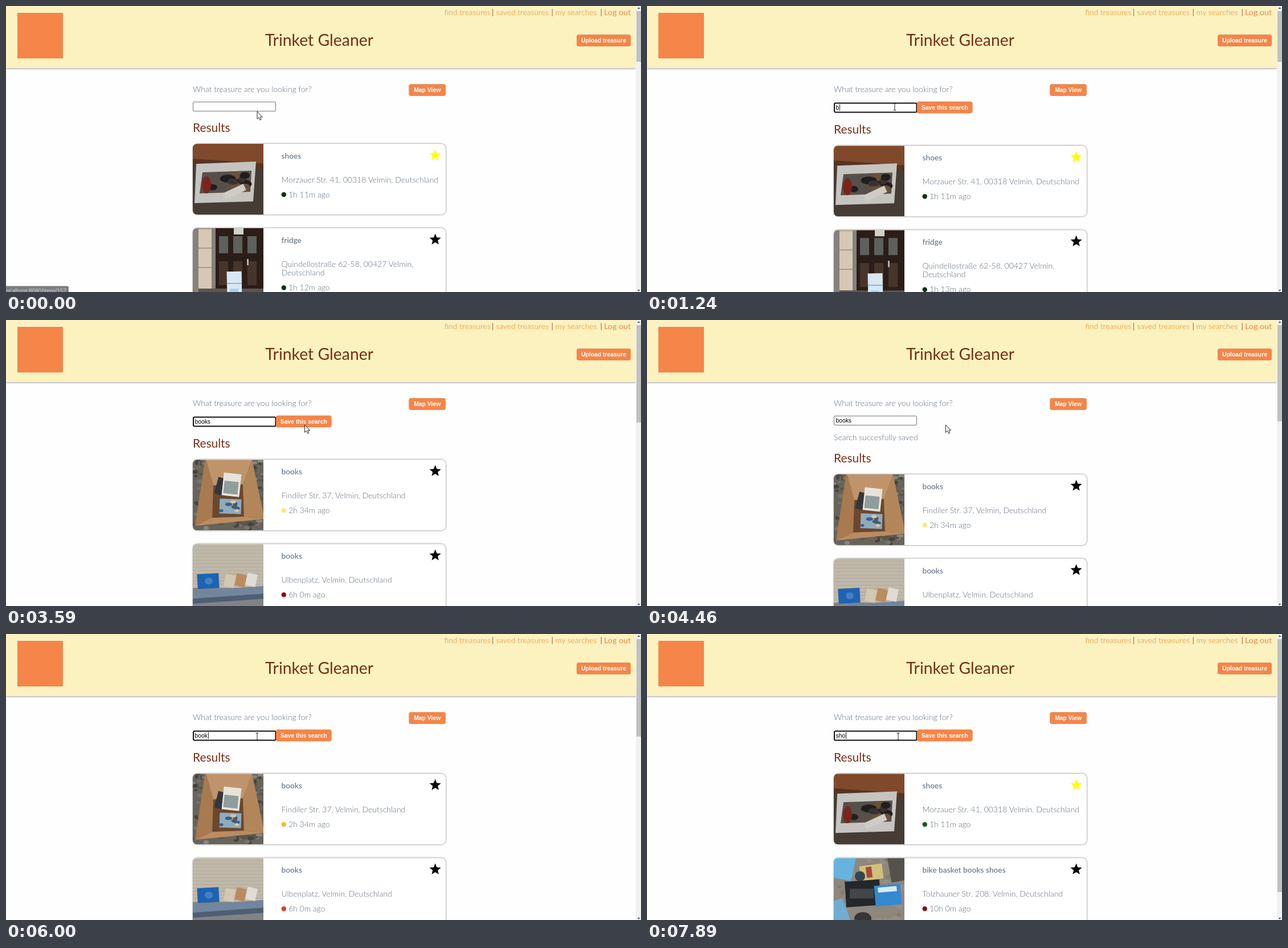
An HTML page that plays this animation: 1115x502 px, repeating every 8 s.

```html
<!DOCTYPE html>
<html lang="en">
<head>
<meta charset="utf-8">
<title>Trinket Gleaner</title>
<style>
  html, body { margin: 0; width: 100%; height: 100%; overflow: hidden; background: #fefefe; }
  svg { display: block; width: 1115px; height: 502px; }
  text { font: 300 14px Lato, "Open Sans", sans-serif; fill: #5d6d7e; white-space: pre; }
  .title { font-size: 28.4px; font-weight: 400; fill: #772f1a; text-anchor: middle; }
  .heading { font-size: 20.9px; font-weight: 400; fill: #772f1a; }
  .name { font-weight: 600; font-size: 13.7px; fill: #708090; }
  .nav { font-size: 13.6px; font-weight: 400; fill: #f2b05e; }
  .bar { fill: #b5482a; }
  .logout { font-size: 14.3px; fill: #f58549; }
  .button { font: 700 10.4px "Liberation Sans", Arial, sans-serif; fill: #fff; text-anchor: middle; }
  .typed { font: 400 10.3px "Liberation Sans", Arial, sans-serif; fill: #000; }
  .status { font: 400 9.6px "Open Sans", sans-serif; fill: #d0d3d4; }
  .shadow { filter: drop-shadow(0 0 1.6px #666); }
  .soft { filter: drop-shadow(0 0 .7px #aaa); }
  .header { filter: drop-shadow(0 1px 1.5px #999); }
  .photo { filter: blur(.5px); }
</style>
</head>
<body>
<svg viewBox="0 0 1115 502">
  <defs>
    <clipPath id="corner"><path d="M124 0H8Q0 0 0 8V116Q0 124 8 124H124Z"/></clipPath>
  </defs>
  <g id="stage"></g>
</svg>
<script>
const LOOP = 8000;
const stage = document.getElementById('stage');

const within = (t, from, to) => t >= from && t < to;
const repeat = (count, make) => Array.from({length: count}, (_, i) => make(i)).join('');

const rect = (x, y, w, h, fill, extra = '') =>
  `<rect x="${x}" y="${y}" width="${w}" height="${h}" fill="${fill}" ${extra}/>`;
const tilted = (x, y, w, h, angle, fill) =>
  rect(x - w / 2, y - h / 2, w, h, fill, `transform="rotate(${angle} ${x} ${y})"`);
const poly = (points, fill) => `<polygon points="${points.join(' ')}" fill="${fill}"/>`;
const oval = (x, y, rx, ry, fill) => `<ellipse cx="${x}" cy="${y}" rx="${rx}" ry="${ry}" fill="${fill}"/>`;
const text = (x, y, words, type = '') => `<text x="${x}" y="${y}" class="${type}">${words}</text>`;
const button = (x, y, w, label) =>
  rect(x, y, w, 20.5, '#f58549', 'rx="3.5" class="soft"') + text(x + w / 2, y + 14, label, 'button');

// Seeded specks filling a box, for pavement and clutter
function scatter(count, x, y, w, h, size, colors) {
  let seed = 7;
  const random = () => (seed = seed * 16807 % 2147483647) / 2147483647;
  return repeat(count, i => oval(x + w * random(), y + h * random(),
    size * (.6 + random()), size * (.5 + random() / 2), colors[i % colors.length]));
}
const paving = () => scatter(140, 0, 0, 124, 124, 4, ['#5b574f', '#77736a', '#47443e', '#8a867d']);

function cartonFlaps() {
  const inner = [[36, 45], [88, 43], [90, 100], [34, 102]];
  const outer = [[22, -4], [104, 0], [126, 104], [4, 116]];
  const shades = ['#c0946a', '#b3865a', '#ba8c60', '#a87a50'];
  return poly(inner, '#6c472c') + repeat(4, i => {
    const next = (i + 1) % 4;
    return poly([inner[i], outer[i], outer[next], inner[next]], shades[i]);
  });
}

const photos = {
  shoes:
    rect(0, 0, 124, 124, '#453c35') + rect(0, 0, 124, 36, '#80492b') +
    tilted(60, 35, 130, 10, 4, '#563424') +
    poly([[6, 35], [111, 31], [106, 101], [3, 104]], '#c6c4bf') +
    poly([[17, 50], [103, 47], [101, 84], [12, 87]], '#575049') +
    scatter(14, 35, 54, 62, 24, 9, ['#211e1e', '#6a5138', '#39322e']) +
    oval(24, 72, 8, 15, '#7a2420') + tilted(73, 84, 40, 12, -25, '#cfccc5'),
  fridge:
    rect(0, 0, 124, 124, '#2b1e18') + rect(0, 0, 40, 124, '#85827b') + rect(10, 0, 23, 124, '#d5c9b5') +
    repeat(3, i => rect(10, 34 * i, 23, 2, '#a79b8b')) +
    repeat(3, i => rect(46 + i * 25, 14, 16, 30, '#5d605d') + rect(46 + i * 25, 58, 16, 42, '#48352a')) +
    rect(72, 0, 17, 11, '#d0d0cc') + rect(95, 54, 3, 11, '#b5b1a8') + rect(10, 106, 114, 18, '#5d554e') +
    tilted(73, 101, 26, 50, -1, '#d8e8f2') + rect(60, 96, 26, 2, '#87b9dc') + rect(65, 106, 15, 12, '#a9d2ec'),
  carton:
    rect(0, 0, 124, 124, '#67645c') + paving() + cartonFlaps() +
    tilted(50, 47, 18, 30, 15, '#34363a') + tilted(68, 44, 31, 40, 6, '#e6e3dc') +
    tilted(67, 49, 25, 22, 6, '#8f9d9c') + tilted(66, 82, 38, 26, 2, '#8fabbd') +
    scatter(10, 50, 73, 30, 18, 4, ['#37618b', '#d8c5a0', '#4d5964']),
  bench:
    rect(0, 0, 124, 124, '#818386') + rect(0, 0, 124, 77, '#c0b8a9') +
    repeat(12, i => rect(0, 4 + i * 6, 124, 1, '#b1a898')) +
    tilted(62, 85, 130, 14, -4, '#72869d') + tilted(62, 96, 130, 9, -4, '#4e5f74') +
    tilted(27, 65, 38, 26, -3, '#1e63b3') + oval(28, 65, 7, 6, '#4481c2') +
    repeat(3, i => tilted(65 + i * 19, 65 - i, 18, 22, 12, ['#d3c8b2', '#b98c60', '#dedcd5'][i])),
  basket:
    rect(0, 0, 124, 124, '#8d877e') + scatter(60, 0, 0, 124, 124, 5, ['#968f85', '#817b72']) +
    tilted(14, 12, 44, 50, 12, '#65b3de') + tilted(112, 16, 30, 50, -10, '#55524d') +
    tilted(66, 25, 40, 26, -7, '#d0c07a') + tilted(62, 25, 10, 19, -7, '#a4493c') +
    oval(46, 32, 9, 9, '#34444d') + tilted(51, 62, 61, 45, -4, '#24272b') + rect(28, 54, 42, 17, '#43474a') +
    tilted(95, 65, 46, 36, -5, '#3489d0') + tilted(94, 55, 33, 9, -5, '#d9e9f5') +
    tilted(12, 100, 26, 54, -20, '#6faed0') + oval(51, 106, 15, 11, '#383634')
};

const shoes = ['shoes', 'shoes', ['Morzauer Str. 41, 00318 Velmin, Deutschland'], '1h 11m'];
const fridge = ['fridge', 'fridge', ['Quindellostraße 62-58, 00427 Velmin,', 'Deutschland']];
const carton = ['carton', 'books', ['Findiler Str. 37, Velmin, Deutschland'], '2h 34m'];
const bench = ['bench', 'books', ['Ulbenplatz, Velmin, Deutschland'], '6h 0m'];
const basket = ['basket', 'bike basket books shoes', ['Tolzhauner Str. 208, Velmin, Deutschland'], '10h 0m'];

const starPoints = Array.from({length: 10}, (_, i) => {
  const radius = i % 2 ? 4.7 : 10.6, angle = i * Math.PI / 5;
  return [753.7 + radius * Math.sin(angle), 20 - radius * Math.cos(angle)];
});

function card(top, [photo, name, address, age], dot, starColor) {
  const extra = (address.length - 1) * 15.5;
  return `<g transform="translate(0 ${top})">` +
    rect(328.5, 0, 443.5, 124, '#fff', 'rx="8" class="shadow"') +
    `<g transform="translate(328)" clip-path="url(#corner)"><g class="photo">${photos[photo]}</g></g>` +
    text(483.5, 26.3, name, 'name') +
    address.map((line, i) => text(483.5, 67.7 + i * 15.5, line)).join('') +
    oval(487.8, 89 + extra, 4.2, 4.2, dot) + text(496, 93.6 + extra, age + ' ago') +
    poly(starPoints, starColor) + '</g>';
}

const navigation = `<text y="16" class="nav"><tspan x="769.5">find treasures</tspan>` +
  `<tspan x="853" class="bar">|</tspan><tspan x="860.5">saved treasures</tspan>` +
  `<tspan x="957.5" class="bar">|</tspan><tspan x="964.5">my searches</tspan>` +
  `<tspan x="1043.5" class="bar">|</tspan><tspan x="1050" class="logout">Log out</tspan></text>`;

const pageTop =
  rect(0, 0, 1106, 109, '#fbf2c0', 'class="header"') +
  rect(20, 12, 80, 80, '#f58549') + navigation +
  text(550, 70, 'Trinket Gleaner', 'title') +
  button(1002, 50.3, 95, 'Upload treasure') +
  text(328, 151.3, 'What treasure are you looking for?') +
  button(707.5, 137.3, 64.5, 'Map View');

// One press at `first`, then a steady rhythm from `second` on
const presses = (t, first, second, gap) =>
  t < first ? 0 : 1 + Math.max(0, Math.floor((t - second) / gap) + 1);

function query(t) {
  if (t >= 7590) return 'sho'.slice(0, 1 + presses(t, 7590, 7810, 200));
  if (t >= 6000) return 'book'.slice(0, Math.max(0, 4 - presses(t, 6080, 6470, 285)));
  return 'books'.slice(0, presses(t, 1240, 1490, 153));
}

// Progress from 0 to 1 in equal jumps
const stepped = (t, start, gap, count) =>
  Math.max(0, Math.min(count, Math.floor((t - start) / gap) + 1)) / count;

const home = [441, 185];
const moves = [
  {start: 80, gap: 70, count: 3, to: [435, 177], sag: 0},
  {start: 2880, gap: 79, count: 10, to: [524.5, 184], sag: 37},
  {start: 4920, gap: 78, count: 6, to: [441, 180], sag: 0}
];
const pointer = t => moves.reduce(([x, y], {start, gap, count, to, sag}) => {
  const p = stepped(t, start, gap, count);
  return [x + (to[0] - x) * p, y + (to[1] - y) * p + sag * Math.sin(Math.PI * p)];
}, home);

function caretVisible(t) {
  const busy = within(t, 1240, 1950) || within(t, 6000, 7040) || t >= 7590;
  const blinkStart = [7040, 5540, 1950, 460].find(start => start <= t);
  return busy || (t - blinkStart) % 1080 < 540;
}

function searchBox(t, typed, top, focused) {
  const caretX = 332 + Math.round(typed.length * 5.7);
  const frame = focused
    ? rect(329, top + .5, 144.5, 16, '#fff', 'rx="2" stroke="#101010" stroke-width="2"')
    : rect(328.5, top + .5, 145, 16, '#fff', 'rx="1.5" stroke="#767676"');
  return frame + text(331.5, top + 12, typed, 'typed') +
    (focused && caretVisible(t) ? rect(caretX, top + 2.5, 1, 11.5, '#222') : '');
}

function results(t, typed, shift) {
  const late = t >= 6000;
  const [green, yellow, red] = late ? ['#0e6014', '#f8b92e', '#df4023'] : ['#0b3212', '#fbe970', '#8b1010'];
  let list = [shoes, [...fridge, t < 1240 ? '1h 12m' : '1h 13m']], dots = [green, green];
  if (typed.startsWith('bo')) [list, dots] = [[carton, bench], [yellow, red]];
  if (typed === 'sho') [list, dots] = [[shoes, basket], [green, '#8b1010']];
  // The saved mark arrives a moment after the list itself
  const saved = list[0] === shoes && !within(t, 6710, 7110) && !within(t, 7810, 7890);
  return text(328, 220.7 + shift, 'Results', 'heading') +
    list.map((item, i) => card(242 + shift + i * 148, item, dots[i], saved && !i ? '#ff0' : '#080808')).join('');
}

function scrollbar(typed, savedNote) {
  let end = 98;
  if (typed.startsWith('bo')) end = Math.min(180, 122 + 14.5 * typed.length) - (savedNote ? 2 : 0);
  if (typed === 'sho') end = 453;
  return rect(1106, 0, 9, 502, '#f1f1f1') + rect(1107, 9, 8, end - 9, '#c1c1c1') +
    poly([[1108.5, 5], [1111, 2], [1113.5, 5]], '#555') +
    poly([[1108.5, 498], [1111, 501], [1113.5, 498]], '#555');
}

function cursor([x, y], inputTop) {
  const overInput = x < 474 && within(y, inputTop, inputTop + 17);
  const shape = overInput
    ? '<path d="M-2.5 -6H2.5M0 -6V6M-2.5 6H2.5" fill="none" stroke="#222"/>'
    : '<path d="M0 0V13.3L3 10.6L5 15.2L7.2 14.2L5.2 9.8H9.2Z" fill="#fff" stroke="#111" stroke-width=".9"/>';
  return `<g transform="translate(${x} ${y})">${shape}</g>`;
}

const clickGlow = t => [[460, 230], [4150, 150], [5540, 160]]
  .filter(([start, length]) => within(t, start, start + length))
  .map(([start]) => oval(...pointer(start), 10, 10, 'rgba(255,255,0,.47)')).join('');

const linkStatus = t => `<g opacity="${1 - stepped(t, 80, 70, 3)}">` +
  rect(-5, 491.5, 115, 20, '#7d8082', 'rx="3"') +
  text(-2.5, 502.5, 'localhost:8080/item/157', 'status') + '</g>';

function scene(t) {
  const typed = query(t);
  const savedNote = within(t, 4460, 6000);
  const canSave = t >= 1240 && !savedNote;
  const focused = within(t, 460, 4150) || t >= 5540;
  const inputTop = canSave ? 170 : 168;
  const shift = savedNote ? 29 : canSave ? 3.2 : 0;
  return pageTop + searchBox(t, typed, inputTop, focused) +
    (canSave ? button(474, 167.8, 97.5, 'Save this search') : '') +
    (savedNote ? text(328, 210.8, 'Search succesfully saved') : '') +
    results(t, typed, shift) + scrollbar(typed, savedNote) + linkStatus(t) +
    clickGlow(t) + cursor(pointer(t), inputTop);
}

let shown = '';
function draw() {
  const markup = scene(performance.now() % LOOP);
  if (markup !== shown) stage.innerHTML = shown = markup;
  requestAnimationFrame(draw);
}
draw();
</script>
</body>
</html>
```
